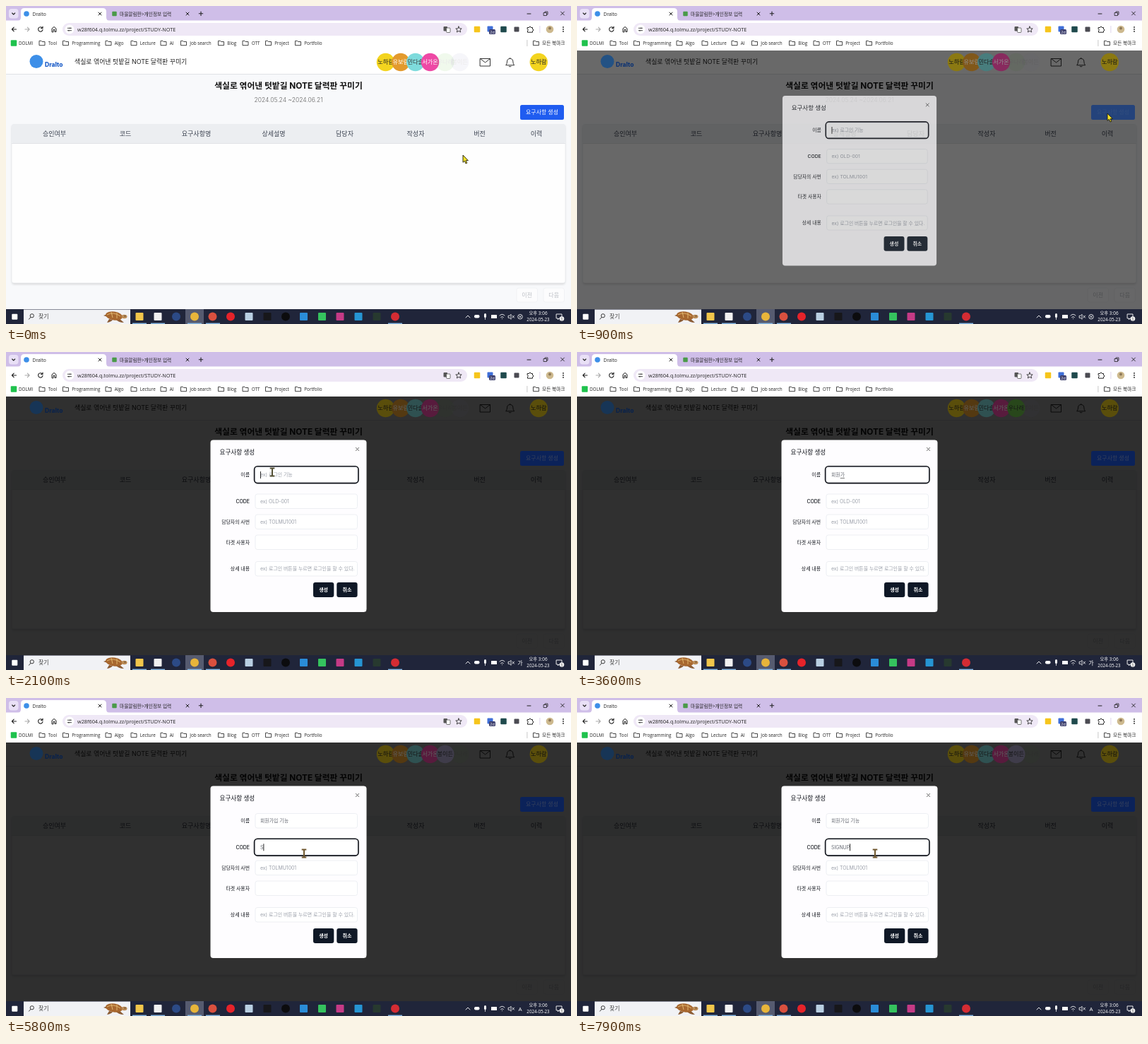
An HTML page for the animation above (8000 ms loop, 800 by 450 pixels).

```html
<!DOCTYPE html>
<html lang="ko">
<head>
<meta charset="utf-8">
<title>Requirement form</title>
<style>
  html, body { margin: 0; width: 100%; height: 100%; overflow: hidden; background: #f8f9fb; }
  svg { display: block; width: 100vw; height: 100vh; }
  text { font-family: Inter, "Noto Sans CJK KR", "Noto Sans CJK JP", sans-serif; white-space: pre; }
  .ui text { font-family: "Open Sans", "Noto Sans CJK KR", sans-serif; }
  .line { fill: none; stroke: #222; stroke-linecap: round; stroke-linejoin: round; }
  .mid { text-anchor: middle; }
  .end { text-anchor: end; }
</style>
</head>
<body>
<svg id="stage" viewBox="0 0 800 450" xmlns="http://www.w3.org/2000/svg"></svg>
<script>
const text = (x, y, size, str, fill = '#222', cls = '', weight = 400, id = '') =>
  `<text id="${id}" class="${cls}" x="${x}" y="${y}" font-size="${size}" fill="${fill}" font-weight="${weight}">${str}</text>`;
const rect = (x, y, w, h, fill, r = 0, extra = '') =>
  `<rect x="${x}" y="${y}" width="${w}" height="${h}" rx="${r}" fill="${fill}" ${extra}/>`;
const circle = (x, y, r, fill, extra = '') => `<circle cx="${x}" cy="${y}" r="${r}" fill="${fill}" ${extra}/>`;
const line = (d, color = '#222', w = 1) => `<path class="line" d="${d}" style="stroke:${color}" stroke-width="${w}"/>`;
const square = (x, y, s, fill) => rect(x - s / 2, y - s / 2, s, s, fill, 1);
const cross = (x, y, s, color, w) => line(`M${x - s} ${y - s}l${2 * s} ${2 * s}m0 ${-2 * s}l${-2 * s} ${2 * s}`, color, w);
const folder = x => line(`M${x - 4} 55.3v-6h3l1 1.2h4v4.8z`, '#333', .9);

const COURSE = '색실로 엮어낸 텃밭길 NOTE 달력판 꾸미기';
const BOOKMARKS = [[51, 'Tool'], [84.5, 'Programming'], [145, 'Algo'], [181, 'Lecture'], [223, 'AI'],
  [251.5, 'Job search'], [304.5, 'Blog'], [339, 'OTT'], [371.5, 'Project'], [413.5, 'Portfolio']];

const browser = () => `<g class="ui">
  ${rect(0, 0, 800, 22, '#cfbee8')}
  ${rect(4, 4, 13.5, 13.5, '#e9e0f6', 4)}${line('M8.7 10l2 2l2-2', '#222', 1.1)}
  <path d="M16 21q5 0 5-5V8q0-5 5-5H137q5 0 5 5v8q0 5 5 5z" fill="#fff"/>
  ${circle(29, 11, 3.8, '#3d8fe8')}${text(37.5, 13.7, 6.7, 'Dralto')}${cross(133, 11, 2, '#222', 1)}
  ${square(153.5, 11, 6.5, '#4a9a4a')}${text(161, 13.7, 6.7, '마을알림판&gt;개인정보 입력')}${cross(257, 11, 2, '#222', 1)}
  ${line('M276 8v5.4M273.3 10.7h5.4', '#222', 1.1)}
  ${line('M738 11h5')}${line('M761.5 9.5h4v4h-4zM763 9v-1h4v4h-1', '#222', .8)}${cross(788, 10.5, 2.4, '#222', .9)}
  ${rect(0, 20.5, 800, 42.5, '#fff')}
  ${line('M14.5 33h-6m2.7-2.8l-2.8 2.8l2.8 2.8', '#222', 1.1)}
  ${line('M27 33h6m-2.7-2.8l2.8 2.8l-2.8 2.8', '#aaa', 1.1)}
  ${line('M51.3 31a3.2 3.2 0 1 0 .7 2.3M52 29v2.5h-2.5', '#222', 1.1)}
  ${line('M65 36.5v-4.5l3-2.6l3 2.6v4.5h-2v-3h-2v3z')}
  ${rect(80, 24, 573, 18, '#efe8f6', 9)}${circle(90, 33, 6.5, '#fff')}
  ${line('M87.3 31.3h2.5m2 0h.8M87.3 34.7h.8m2 0h2.5', '#333', .9)}${circle(90.8, 31.3, .9, '#333')}${circle(89, 34.7, .9, '#333')}
  ${text(101, 35.6, 7.3, 'w28f604.q.tolmu.zz/project/STUDY-NOTE')}
  ${rect(619.5, 29, 5.5, 6.5, '#555', 1)}${rect(623.5, 31, 5.5, 6.5, '#fff', 1, 'stroke="#555" stroke-width=".8"')}
  ${line('M641 29l1.2 2.8l3 .2l-2.3 2l.8 3l-2.7-1.6l-2.7 1.6l.8-3l-2.3-2l3-.2z', '#333', .9)}
  ${square(667, 33, 8.5, '#f6c51c')}${square(685.5, 32.5, 8, '#3f6fd8')}
  ${rect(684, 33, 9, 7, '#3d3f6d', 1.5)}${text(688.5, 38.8, 5.5, '2d', '#fff', 'mid')}
  ${square(704.5, 33, 8.5, '#1f4a4d')}${square(723, 33, 7, '#4b4b52')}
  ${line('M738.5 30.5h2.2a1.3 1.3 0 0 1 2.6 0h2.2v2.2a1.3 1.3 0 0 1 0 2.6v1.9h-7v-2.2a1.2 1.2 0 0 0 0-2.3z')}
  ${rect(755.5, 28, .8, 10, '#d8cbe8')}${circle(770, 33, 5.3, '#cdb98e')}${circle(770, 31.5, 2, '#8d7858')}
  ${[30, 33, 36].map(y => circle(789, y, .9, '#222')).join('')}
  ${square(11, 52.5, 8.5, '#1fc24d')}${text(18, 54.8, 6.3, 'DOLMI')}
  ${BOOKMARKS.map(([x, name]) => folder(x) + text(x + 8.8, 54.8, 6.3, name)).join('')}
  ${rect(737.5, 48, .8, 9, '#bbb')}${folder(750.5)}${text(759, 54.8, 6.7, '모든 북마크')}
</g>`;

const HEADS = [[68.5, '승인여부'], [169, '코드'], [269.5, '요구사항명'], [379, '상세설명'],
  [479.5, '담당자'], [580, '작성자'], [670.5, '버전'], [751, '이력']];

const page = () => `
  ${rect(0, 63, 800, 366, '#f8f9fb')}${rect(0, 63, 800, 33.5, '#fff')}${rect(0, 96, 800, 1, '#e0e2e6')}
  ${text(97, 82.3, 8.9, COURSE)}
  ${line('M671.5 74.5h14v10.5h-14zl7 5.5l7-5.5', '#333')}
  ${line('M708 83.5q1.5-1.5 1.5-4.5q0-4.5 4.2-4.5t4.2 4.5q0 3 1.5 4.5zM712.3 85.5q1.4 1 2.8 0M713.7 74.4v-1', '#333')}
  ${text(400, 117.3, 11.8, COURSE, '#111', 'mid', 700)}
  ${text(400, 136, 8.5, '2024.05.24 ~2024.06.21', '#666', 'mid', 300)}
  ${rect(8.5, 169, 783, 225, '#0002', 3, 'filter="url(#soft)"')}
  ${rect(8, 167.5, 784, 224.5, '#fefefe', 3, 'stroke="#e6e8eb" stroke-width=".7"')}
  ${rect(8, 167.5, 784, 27, '#eceef1', 3)}${rect(8, 194, 784, .8, '#dcdfe3')}
  ${HEADS.map(([x, name]) => text(x, 184, 9, name, '#3d4452', 'mid', 500)).join('')}
  ${[[723, '이전'], [761, '다음']].map(([x, name]) =>
    rect(x, 399, 29.5, 20, '#fcfcfd', 3, 'stroke="#eff0f3" stroke-width=".8"') + text(x + 14.7, 412, 8, name, '#bcbfc5', 'mid')).join('')}`;

const avatar = (x, name, fill, ink = '#fff', id = '') =>
  `<g id="${id}" transform="translate(${x} 79.5)">${circle(0, 0, 12.7, fill)}${text(0, 2.9, 8.2, name, ink, 'mid')}</g>`;

const accents = () => `<g id="accents">
  ${circle(43, 78.5, 9.5, '#3d8fe8')}${text(55, 85.5, 8.5, 'Dralto', '#1b5cc8', '', 800)}
  ${avatar(537.5, '노하람', '#f3d41f', '#222')}${avatar(558.8, '유보람', '#e39a2d')}
  ${avatar(579.7, '민다솔', '#7edbdc', '#333')}${avatar(600.5, '서가온', '#ee49a5')}
  ${avatar(621.8, '우나래', '#6cc04a', '#333', 'green')}${avatar(642.6, '봉이든', '#aaa3c8', '#333', 'purple')}
  ${avatar(754.3, '노하람', '#f3d41f', '#222')}
  <rect id="create" x="728" y="140" width="62" height="21" rx="2.5"/>
  ${text(759, 153.4, 7.9, '요구사항 생성', '#fff', 'mid', 400, 'createText')}
</g>`;

const ROWS = [[163.5, '이름', 'ex) 로그인 기능', 'name'], [201, 'CODE', 'ex) OLD-001', 'code'],
  [230, '담당자의 사번', 'ex) TOLMU1001', ''], [259, '타겟 사용자', '', ''],
  [296.5, '상세 내용', 'ex) 로그인 버튼을 누르면 로그인을 할 수 있다.', '']];

const dialog = () => `<g id="dialog">
  ${rect(289.5, 124.5, 221, 243.5, '#fefdff', 4)}
  ${text(302.5, 145.2, 8.6, '요구사항 생성', '#15181f', '', 500)}${cross(497.5, 137.5, 2.1, '#555', .9)}
  ${ROWS.map(([y, label, hint, id]) => text(345, y + 12.7, 6.9, label, '#15181f', 'end', 500)
    + rect(353, y, 144.5, 20.5, '#fff', 3, 'stroke="#e9ebf0" stroke-width=".8"')
    + text(360, y + 12.9, 6.9, hint, '#9a9fa9', '', 400, id)).join('')}
  <rect id="ring" x="351.6" width="147.4" height="23.8" rx="4.5" fill="none" stroke="#0c0f16" stroke-width="1.6"/>
  <rect id="caret" width=".9" height="10" fill="#111"/>
  <rect id="compose" y="178" height=".7" fill="#444"/>
  ${[[435, '생성'], [468.3, '취소']].map(([x, name]) =>
    rect(x, 326, 29.3, 21, '#0f1826', 3) + text(x + 14.6, 339.2, 7, name, '#fff', 'mid', 700)).join('')}
</g>`;

const APPS = [[189, '#f2c64b', 0], [215, '#f1f1f1', 0], [241, '#2c4a86', 1], [267, '#e8b53a', 1], [292.5, '#d9503f', 1],
  [318, '#e6232a', 1], [344, '#b9cfe2', 0], [370, '#17171a', 0], [396, '#0c0c0e', 1], [421.5, '#2a8cd8', 0],
  [447.5, '#35c25e', 0], [473, '#c53a86', 0], [499, '#2695d3', 0], [525, '#27392f', 0], [551, '#d42c33', 1]];

const turtle = () => `
  <path d="M147 441l-9-3q5-3 12 0zM160 442l7 6q-8 0-12-5zM146 443l-3 5q6-1 8-4z" fill="#8a5b34"/>
  <ellipse cx="153" cy="438.5" rx="12" ry="6" fill="#a7672f" transform="rotate(8 153 438.5)"/>
  <path d="M143 437q9-5 19 2M149 433l2 8m6-7v8" fill="none" stroke="#e0b56d" stroke-width="1"/>
  <ellipse cx="167.5" cy="439.5" rx="4" ry="2.8" fill="#b98a55"/>${circle(168.5, 438.8, .7, '#222')}`;

const taskbar = () => `<g class="ui">
  ${rect(0, 429, 800, 21, '#20253a')}${square(12.3, 439.7, 8, '#fff')}
  ${rect(25, 429.5, 151, 20.5, '#f1f2f5')}
  ${circle(36.8, 438.3, 2.6, 'none', 'stroke="#333"')}${line('M35 440.4l-2.5 2.8', '#333')}
  ${text(46, 442.2, 8, '찾기', '#444')}${turtle()}
  ${rect(254, 429, 26, 21, '#565b70')}
  ${APPS.map(([x, fill, round]) => round ? circle(x, 439.5, 6, fill) : square(x, 439.5, 11, fill)).join('')}
  ${[189, 215, 267, 293, 551].map(x => rect(x - 10, 448.6, 20, 1.4, '#86b8e6')).join('')}
  ${line('M651 441l3-3l3 3', '#fff', .9)}
  ${rect(663, 437, 7.5, 4.5, '#fff', 2)}${rect(677, 435, 3, 6, '#fff', 1.5)}${line('M678.5 441v2.5', '#fff', .8)}
  ${rect(687, 437, 8, 5, '#fff', .5)}
  ${line('M699 438q3.5-3.5 7 0M700.7 440.5q1.8-1.8 3.6 0M702.5 442.6v.1', '#fff', .9)}
  ${line('M711.5 438.3h1.5l2-2v7l-2-2h-1.5zM717 438.2l2.6 3M719.6 438.2l-2.6 3', '#fff', .8)}
  <g id="imeOff">${circle(728, 439.7, 3.3, 'none', 'stroke="#fff" stroke-width=".8"')}${cross(728, 439.7, 1.3, '#fff', .8)}</g>
  ${text(728, 442.6, 8, '', '#fff', 'mid', 400, 'ime')}
  ${text(753.5, 437.4, 6.4, '오후 3:06', '#fff', 'mid')}${text(753.5, 446.3, 6.2, '2024-05-23', '#fff', 'mid')}
  ${line('M779.5 436h7.5v6h-4l-1.5 1.8v-1.8h-2z', '#fff', .9)}${circle(787, 442.5, 3.3, '#eee')}${text(787, 444.5, 5, '1', '#222', 'mid')}
</g>`;

const pointers = () => `
  <path id="arrow" d="M0 0v10.3l2.4-2l1.6 3.7l1.8-.8l-1.6-3.5h3.2z" fill="#f4e32b" stroke="#1c1a08" stroke-width=".9"/>
  <path id="beam" d="M-3.3-5.4h6.6M0-5.4v10.8M-3.3 5.4h6.6" fill="none" stroke="#545035" stroke-width="2"/>`;

document.getElementById('stage').innerHTML =
  `<defs><filter id="soft"><feGaussianBlur stdDeviation="1.6"/></filter></defs>`
  + page() + rect(0, 63, 800, 366, '#000', 0, 'id="shade"') + accents() + dialog()
  + browser() + taskbar() + pointers();

const $ = id => document.getElementById(id);
const set = (id, attrs) => { for (const k in attrs) $(id).setAttribute(k, attrs[k]); };
const write = (id, str) => { if ($(id).textContent !== str) $(id).textContent = str; };

const NAME_STEPS = ['ㅎ', '호', '회', '횡', '회우', '회워', '회원', '회원ㄱ', '회원가', '회원강', '회원가이',
  '회원가입', '회원가입 ', '회원가입 기', '회원가입 긴', '회원가입 기능'];
const CODE_TIMES = [5700, 6000, 6300, 6600, 6900, 7500];
const PATH = [[0, 647, 211], [100, 647, 211], [700, 752, 154], [900, 751, 152], [1000, 743, 161],
  [1900, 377, 170], [4700, 377, 170], [5100, 382, 206], [5500, 422, 220], [8000, 422, 220]];

function pointerAt(t) {
  const i = PATH.findIndex((p, n) => n && t <= p[0]);
  const [t0, x0, y0] = PATH[i - 1], [t1, x1, y1] = PATH[i];
  const u = (t - t0) / (t1 - t0), e = u * u * (3 - 2 * u);
  return [x0 + (x1 - x0) * e, y0 + (y1 - y0) * e];
}

function typeField(id, str, hint) {
  write(id, str || hint);
  set(id, { fill: str ? '#666a73' : '#9a9fa9' });
  return str ? $(id).getComputedTextLength() : 0;
}

function drawDialog(t) {
  const opening = t < 1000;
  set('dialog', {
    opacity: t < 900 ? 0 : opening ? .75 : 1,
    transform: opening ? 'translate(400 247.3) scale(.987) translate(-400 -246.3)' : ''
  });
  const onCode = t >= 5300;
  const step = Math.min(NAME_STEPS.length, Math.floor((t - 2800) / 100) + 1);
  const name = step > 0 ? NAME_STEPS[step - 1] : '';
  const typed = CODE_TIMES.filter(at => t >= at);
  const nameWidth = typeField('name', name, ROWS[0][2]);
  const codeWidth = typeField('code', 'SIGNUP'.slice(0, typed.length), ROWS[1][2]);
  const composing = name && !onCode;
  const since = onCode ? typed[typed.length - 1] || 5300 : opening ? 900 : 1000;
  const blink = Math.floor((t - since) / 500) % 2 === 0;
  set('ring', { y: onCode ? 199.3 : 161.8 });
  set('caret', { x: 360 + (onCode ? codeWidth : 0), y: onCode ? 206.3 : 169, opacity: blink && !composing ? 1 : 0 });
  set('compose', { x: 360 + Math.max(0, nameWidth - 6.3), width: 6.2, opacity: composing && !name.endsWith(' ') ? 1 : 0 });
}

function draw(t) {
  set('shade', { opacity: t < 900 ? 0 : t < 1000 ? .59 : .81 });
  $('accents').style.filter = `brightness(${t < 900 ? 1 : t < 1000 ? .57 : .37})`;

  const hover = t >= 600 && t < 1000;
  set('create', { fill: hover ? '#3f76d8' : '#1f5cf0' });
  set('createText', { opacity: hover ? .12 : t < 600 ? 1 : .5 });

  const left = t >= 5700;
  set('green', { transform: `translate(${left ? 642.6 : 621.8} 79.5)`, opacity: t >= 2800 && !left ? 1 : .1 });
  set('purple', { transform: `translate(${left ? 621.8 : 642.6} 79.5)`, opacity: t >= 4700 ? 1 : .1 });

  drawDialog(t);
  write('ime', t < 1000 ? '' : t < 5500 ? '가' : 'A');
  set('imeOff', { opacity: t < 1000 ? 1 : 0 });

  const [x, y] = pointerAt(t);
  const overField = t >= 1000 && x < 498;
  const hidden = t >= 2800 && t < 4700;
  const at = `translate(${x} ${y})`;
  set('arrow', { transform: at, opacity: overField ? 0 : 1 });
  set('beam', { transform: at, opacity: overField && !hidden ? 1 : 0, stroke: t >= 5500 ? '#70582f' : '#545035' });
}

// The picture advances ten times a second.
function tick() {
  draw(Math.floor(performance.now() % 8000 / 100) * 100);
  requestAnimationFrame(tick);
}
tick();
</script>
</body>
</html>
```
